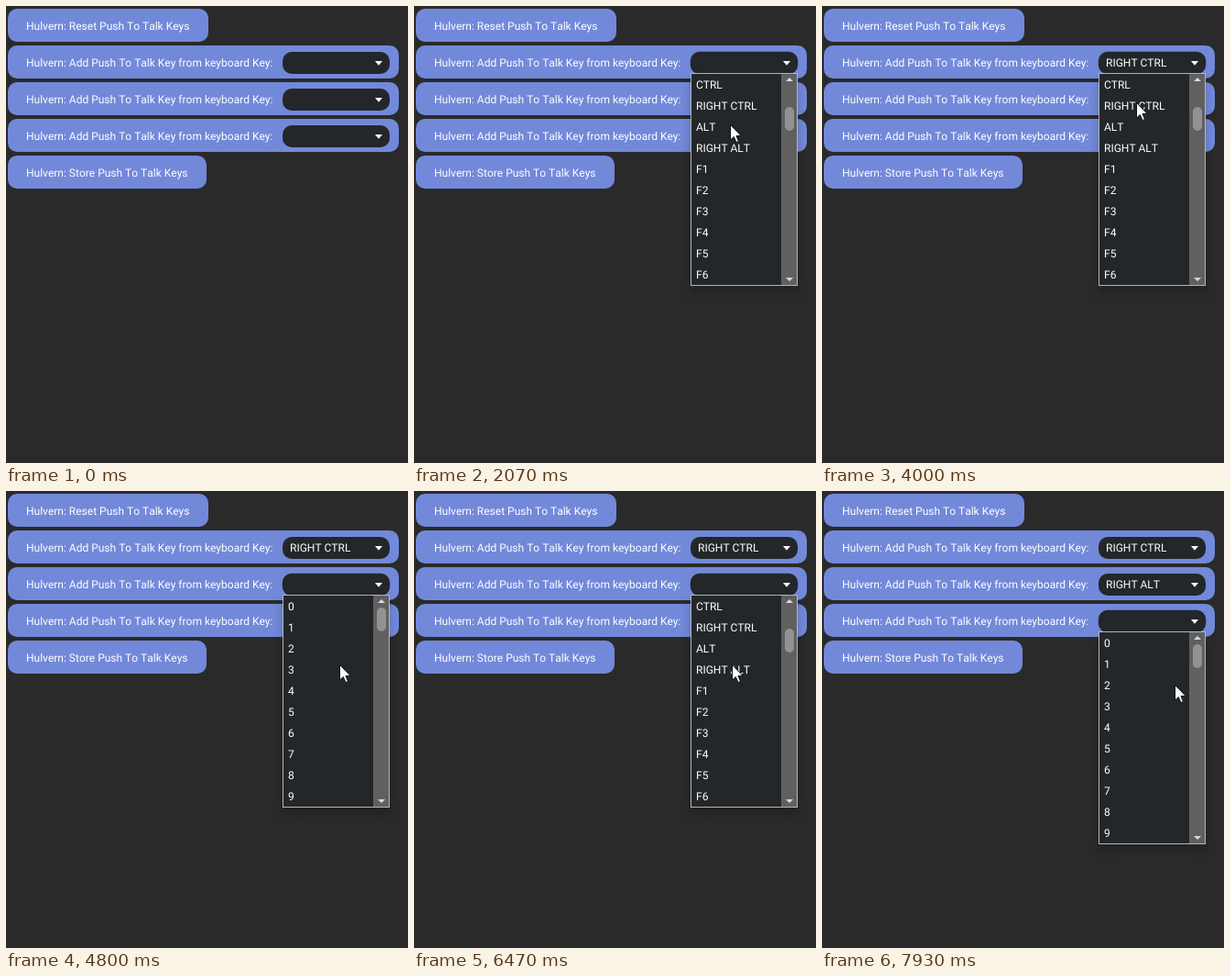
These frames come from a looping animation (439 by 498 pixels, 8000 ms). An HTML page with a canvas:

```html
<!DOCTYPE html>
<html>
<head>
<meta charset="utf-8">
<style>
  html, body { margin: 0; width: 100%; height: 100%; overflow: hidden; background: #2a2a2a; }
  canvas { display: block; }
</style>
</head>
<body>
<canvas id="stage" width="439" height="498"></canvas>
<script>
const ctx = document.getElementById('stage').getContext('2d');
const LOOP = 8000, STEP = 1000 / 15;
const BLURPLE = '#7289da', DARK = '#23272a';
const ROW = 40, ITEM = 23, VISIBLE = 10, LIST_HEIGHT = VISIBLE * ITEM + 2;
const NOTCH = 3, NOTCHES = 4;

const APP = 'Hulvern';
const blocks = [
  { label: 'Reset Push To Talk Keys', width: 219 },
  ...Array(3).fill({ label: 'Add Push To Talk Key from keyboard Key:', width: 427, select: true }),
  { label: 'Store Push To Talk Keys', width: 217 },
];
const count = (n, label) => Array.from({ length: n }, (_, i) => label(i));
const keys = [
  ...count(10, String),
  'SHIFT', 'RIGHT SHIFT', 'CTRL', 'RIGHT CTRL', 'ALT', 'RIGHT ALT',
  ...count(24, i => 'F' + (i + 1)),
];

// The list opens, is scrolled, closes one step after the pick; focus goes at blur.
const dropdowns = [
  { open: 1265, scroll: 1800, pick: 3930, blur: 4530, value: 'RIGHT CTRL' },
  { open: 4530, scroll: 4930, pick: 6665, blur: 7130, value: 'RIGHT ALT' },
  { open: 7730, scroll: LOOP, pick: LOOP, blur: LOOP, value: '' },
];

// Places where the pointer comes to rest: [arrival, x, y]
const MOVE = 300;
const stops = [
  [800, 407, 65], [2067, 345, 129], [3267, 343, 105], [4333, 404, 97], [4800, 364, 189],
  [5333, 338, 228], [5733, 333, 185], [6400, 347, 189], [7000, 399, 130], [7533, 399, 145],
  [7933, 385, 211],
];

const clamp = (v, lo, hi) => Math.min(hi, Math.max(lo, v));

function pointerAt(t) {
  let x = 421, y = 83;
  for (const [arrival, toX, toY] of stops) {
    const k = clamp((t - arrival) / MOVE + 1, 0, 1);
    const eased = k * k * (3 - 2 * k);
    x += (toX - x) * eased;
    y += (toY - y) * eased;
  }
  return [Math.round(x), Math.round(y)];
}

function box(x, y, w, h, r, color) {
  ctx.fillStyle = color;
  ctx.beginPath();
  ctx.roundRect(x, y, w, h, r);
  ctx.fill();
}

function polygon(points, color) {
  ctx.fillStyle = color;
  ctx.beginPath();
  points.forEach(([x, y]) => ctx.lineTo(x, y));
  ctx.closePath();
  ctx.fill();
}

function arrow(x, y, height, color) {
  polygon([[x - 4, y], [x + 4, y], [x, y + height]], color);
}

function text(string, x, baseline) {
  ctx.fillStyle = '#fff';
  ctx.fillText(string, x, baseline);
}

function drawSelect(d, y, t) {
  const grow = t >= d.open && t < d.blur ? 0.2 : 0;
  box(302 - grow, y - grow, 117 + 2 * grow, 24 + 2 * grow, 10, DARK);
  arrow(407, y + 10, 4.7, '#fff');
  if (t >= d.pick) text(d.value, 310, y + 16);
}

function drawList(d, top, t) {
  const first = NOTCH * clamp(Math.floor((t - d.scroll) / STEP), 0, NOTCHES);
  ctx.save();
  ctx.shadowColor = 'rgba(0,0,0,.2)';
  ctx.shadowBlur = 10;
  ctx.shadowOffsetY = 6;
  box(302, top, 117, LIST_HEIGHT, 0, '#b4b4b4');
  ctx.restore();
  box(303, top + 1, 98, LIST_HEIGHT - 2, 0, DARK);
  box(401, top + 1, 17, LIST_HEIGHT - 2, 0, '#606060');
  box(405, top + 14 + first * 23 / 12, 10, 26, 5, '#929292');
  arrow(410, top + 9, -4, '#d8d8d8');
  arrow(410, top + LIST_HEIGHT - 9, 4, '#d8d8d8');
  keys.slice(first, first + VISIBLE).forEach((key, i) => text(key, 308, top + 17 + i * ITEM));
}

function drawPointer(x, y) {
  ctx.save();
  ctx.translate(x + .5, y + .5);
  polygon([[0, 0], [0, 16.5], [3.8, 13], [6.4, 19], [9, 18], [6.5, 12], [11.5, 11.7]], '#fff');
  ctx.strokeStyle = '#111';
  ctx.stroke();
  ctx.restore();
}

function draw(t) {
  box(0, 0, 439, 498, 0, '#2a2a2a');
  ctx.font = '12px Roboto, sans-serif';
  ctx.fontKerning = 'none';
  ctx.textRendering = 'geometricPrecision';
  blocks.forEach((b, i) => {
    const y = 3 + i * ROW;
    box(2, y, b.width, 36, 10, BLURPLE);
    text(`${APP}: ${b.label}`, 22, y + 23);
    if (b.select) drawSelect(dropdowns[i - 1], y + 7, t);
  });
  dropdowns.forEach((d, i) => {
    if (t >= d.open && t < d.pick + 2 * STEP) drawList(d, 73 + i * ROW, t);
  });
  if (t > 730) drawPointer(...pointerAt(t));
}

function frame() {
  const t = performance.now() % LOOP;
  draw(Math.floor((t + 5) / STEP) * STEP);
  requestAnimationFrame(frame);
}
frame();
</script>
</body>
</html>
```
